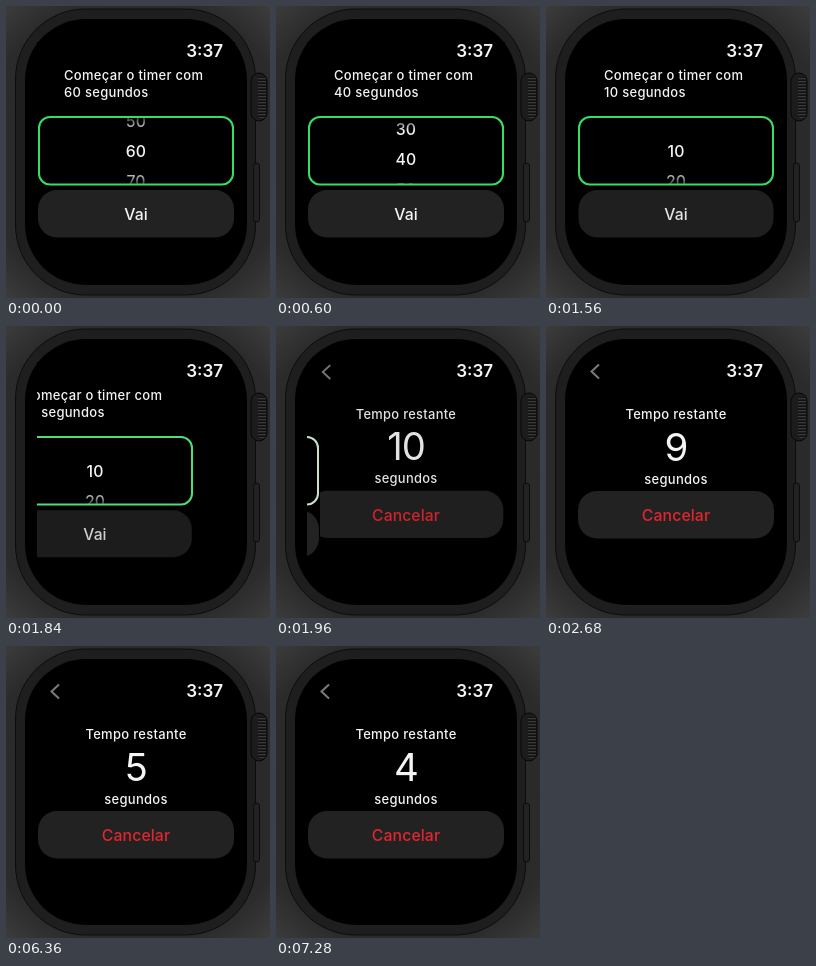
Recreate the animation shown at these times as an HTML page. Size 264x292 px, loop 8000 ms.

```html
<!DOCTYPE html>
<html lang="pt">
<head>
<meta charset="utf-8">
<title>Timer</title>
<style>
  html, body { margin: 0; width: 100%; height: 100%; overflow: hidden; background: #262626; }
  svg { display: block; width: 100vw; height: 100vh; }
  text { font-family: Inter, Roboto, sans-serif; fill: #f4f4f4; }
  .small { font-size: 13px; font-weight: 500; letter-spacing: .3px; }
  .label { font-size: 15.8px; font-weight: 500; letter-spacing: .1px; }
  .mid { text-anchor: middle; }
</style>
</head>
<body>
<svg viewBox="0 0 264 292">
  <defs>
    <radialGradient id="band" gradientUnits="userSpaceOnUse" cx="130" cy="146" r="196">
      <stop offset=".6" stop-color="#2a2a2a"/>
      <stop offset=".8" stop-color="#2b2b2b"/>
      <stop offset="1" stop-color="#3c3c3c"/>
    </radialGradient>
    <linearGradient id="shade" x2="0" y2="1">
      <stop offset="0" stop-opacity=".8"/>
      <stop offset=".2" stop-opacity="0"/>
      <stop offset=".8" stop-opacity="0"/>
      <stop offset="1" stop-opacity=".8"/>
    </linearGradient>
    <pattern id="ridges" width="8" height="3" patternUnits="userSpaceOnUse">
      <rect width="8" height="3" fill="#111"/>
      <rect width="8" height="1.3" fill="#3a3a3a"/>
    </pattern>
    <clipPath id="screen"><rect x="31" y="36" width="198" height="200"/></clipPath>
    <clipPath id="window"><rect x="34" y="112" width="192" height="66"/></clipPath>
  </defs>

  <!-- watch body -->
  <rect width="264" height="292" fill="url(#band)"/>
  <rect x="9.5" y="3" width="240" height="286" rx="70" fill="#1e1e1e" stroke="#0c0c0c"/>
  <rect x="19" y="13" width="222" height="266" rx="61"/>
  <rect x="245" y="67" width="16" height="48" rx="8" fill="#1c1c1c" stroke="#070707"/>
  <rect x="252" y="70" width="8" height="42" rx="3" fill="url(#ridges)"/>
  <rect x="247.5" y="157" width="6" height="59" rx="3" fill="#222" stroke="#0c0c0c"/>

  <g clip-path="url(#screen)">
    <g id="running">
      <path id="back" d="M53 38.5 45.5 45.5 53 52.5" fill="none" stroke="#7b7b7b" stroke-width="2"/>
      <text class="small mid" x="130" y="92.5">Tempo restante</text>
      <text id="count" class="mid" x="130" y="134.5" font-size="38.5" letter-spacing="-1">10</text>
      <text class="small mid" x="130" y="157.5">segundos</text>
      <rect x="32" y="165" width="196" height="47.5" rx="19" fill="#222223"/>
      <text class="label mid" x="130" y="195" style="fill:#e3262e">Cancelar</text>
    </g>
    <g id="setup">
      <rect x="31" y="36" width="198" height="200"/>
      <text class="small" x="58" y="73.5">Começar o timer com</text>
      <text id="chosen" class="small" x="58" y="90.5"></text>
      <g clip-path="url(#window)">
        <g id="wheel"></g>
        <rect x="33" y="111" width="194" height="68" fill="url(#shade)"/>
      </g>
      <rect id="frame" x="33" y="111" width="194" height="67.5" rx="11" fill="none" stroke-width="2"/>
      <g id="go">
        <rect x="32" y="184" width="196" height="47.5" rx="19" fill="#222223"/>
        <text class="label mid" x="130" y="214">Vai</text>
      </g>
    </g>
  </g>
  <text x="217" y="51" text-anchor="end" font-size="17" font-weight="600">3:37</text>
</svg>
<script>
const LOOP = 8000, STEP = 40, ROW = 30;
const $ = id => document.getElementById(id);

// Each track lists [time in ms, value]; values between are linear.
const tracks = {
  row: [[400, 0], [440, .15], [480, .5], [560, 1.6], [640, 2.9], [720, 4.1], [760, 4.5],
        [840, 4.5], [880, 4.63], [960, 4.83], [1040, 4.95], [1120, 5]],
  press: [[1520, 0], [1680, 1], [1800, .8], [1960, 0]],
  slide: [[1760, 0], [1800, 11], [1840, 41], [1880, 96], [1920, 151], [1960, 185], [2000, 199]],
  pale: [[1800, 0], [1840, .15], [1960, .9], [2000, 1]],
  enter: [[1840, 0], [1880, .35], [1920, .75], [1960, .93], [2000, .98], [2040, 1]]
};

function at(track, t) {
  const i = track.findIndex(([time]) => time > t);
  if (i === 0) return track[0][1];
  if (i < 0) return track[track.length - 1][1];
  const [t0, v0] = track[i - 1], [t1, v1] = track[i];
  return v0 + (v1 - v0) * (t - t0) / (t1 - t0);
}

const scaleAbout = (x, y, s) => `translate(${x} ${y}) scale(${s}) translate(${-x} ${-y})`;
const mix = (a, b, k) => `rgb(${a.map((v, i) => Math.round(v + (b[i] - v) * k))})`;

for (let seconds = 10; seconds <= 70; seconds += 10) {
  const label = document.createElementNS('http://www.w3.org/2000/svg', 'text');
  label.setAttribute('class', 'label mid');
  label.setAttribute('x', 130);
  label.setAttribute('y', 151 + (seconds - 60) / 10 * ROW);
  label.textContent = seconds;
  $('wheel').append(label);
}

function render(t) {
  const row = at(tracks.row, t), press = at(tracks.press, t);
  const enter = at(tracks.enter, t), slide = at(tracks.slide, t);

  $('wheel').setAttribute('transform', `translate(0 ${row * ROW})`);
  $('chosen').textContent = `${60 - 10 * Math.ceil(row - .5)} segundos`;
  $('frame').setAttribute('stroke', mix([56, 222, 98], [215, 225, 217], at(tracks.pale, t)));
  $('go').setAttribute('transform', scaleAbout(130, 208, 1 - .02 * press));
  $('go').setAttribute('opacity', 1 - .25 * press);
  $('setup').setAttribute('transform', `translate(${-slide})`);

  $('running').setAttribute('opacity', enter);
  $('running').setAttribute('transform', scaleAbout(130, 130, .9 + .1 * enter));
  $('back').setAttribute('transform', `translate(${10 * (1 - enter)})`);
  $('count').textContent = t < 2680 ? 10 : 9 - Math.floor((t - 2680) / 920);
}

function tick() {
  const t = performance.now() % LOOP;
  render(Math.floor(t / STEP) * STEP);
  requestAnimationFrame(tick);
}
tick();
</script>
</body>
</html>
```
